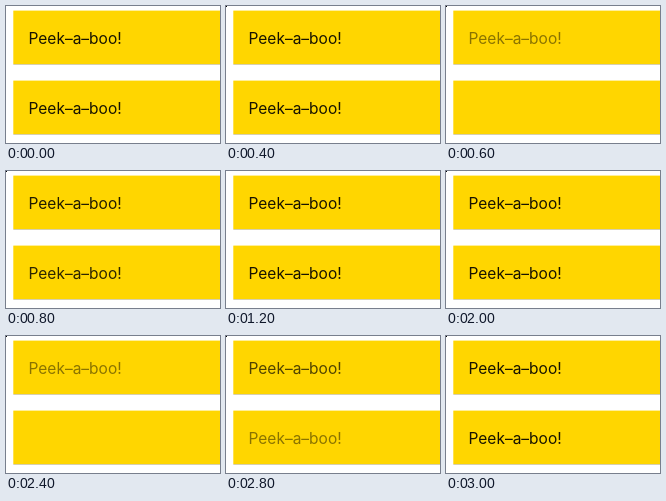
Write an HTML page that moves like this. It is 214 px wide and 137 px high and loops after 4 s.

```html
<!DOCTYPE html>
<html lang="en">
<head>
<meta charset="utf-8">
<style>
html, body { margin: 0; width: 100%; height: 100%; overflow: hidden; background: #fff; }
svg { display: block; width: 214px; height: 137px; }
text { font: 15.5px Inter, "Liberation Sans", sans-serif; fill: #171300; }
.bar { fill: #ffd600; }
.edge { fill: #d6cfae; }
</style>
</head>
<body>
<svg viewBox="0 0 214 137">
  <defs>
    <g id="button">
      <rect class="bar" x="7.3" y="4.6" width="207" height="53.4"/>
      <rect class="edge" x="7.3" y="58" width="207" height="1"/>
    </g>
  </defs>
  <use href="#button"/>
  <use href="#button" y="70"/>
  <text id="faded" x="22.5" y="38">Peek–a–boo!</text>
  <text id="hidden" x="22.5" y="108">Peek–a–boo!</text>
  <rect id="dot" width="1" height="1" fill="#000"/>
</svg>
<script>
const LOOP = 4000, STEP = 200, RELEASE = 250;
const presses = [[600, 605], [1400, 1675], [2400, 2675]];
const dotSpans = [[400, 1000], [1600, LOOP]];
const [faded, hidden, dot] = ["faded", "hidden", "dot"].map(id => document.getElementById(id));
const ease = p => p < 0.5 ? 2 * p * p : 1 - 2 * (1 - p) ** 2;
const start = performance.now();

// 0 while pressed, easing back to 1 after the release
function visibility(t) {
  const press = presses.findLast(([down]) => t >= down);
  if (!press) return 1;
  return ease(Math.min(1, Math.max(0, (t - press[1]) / RELEASE)));
}

function draw(now) {
  const elapsed = Math.max(0, now - start) % LOOP;
  const t = Math.floor(elapsed / STEP) * STEP;
  const v = visibility(t);
  faded.style.opacity = 0.5 + v / 2;
  hidden.style.opacity = v;
  dot.style.opacity = dotSpans.some(([from, to]) => t >= from && t < to) ? 1 : 0;
  requestAnimationFrame(draw);
}
draw(start);
</script>
</body>
</html>
```
